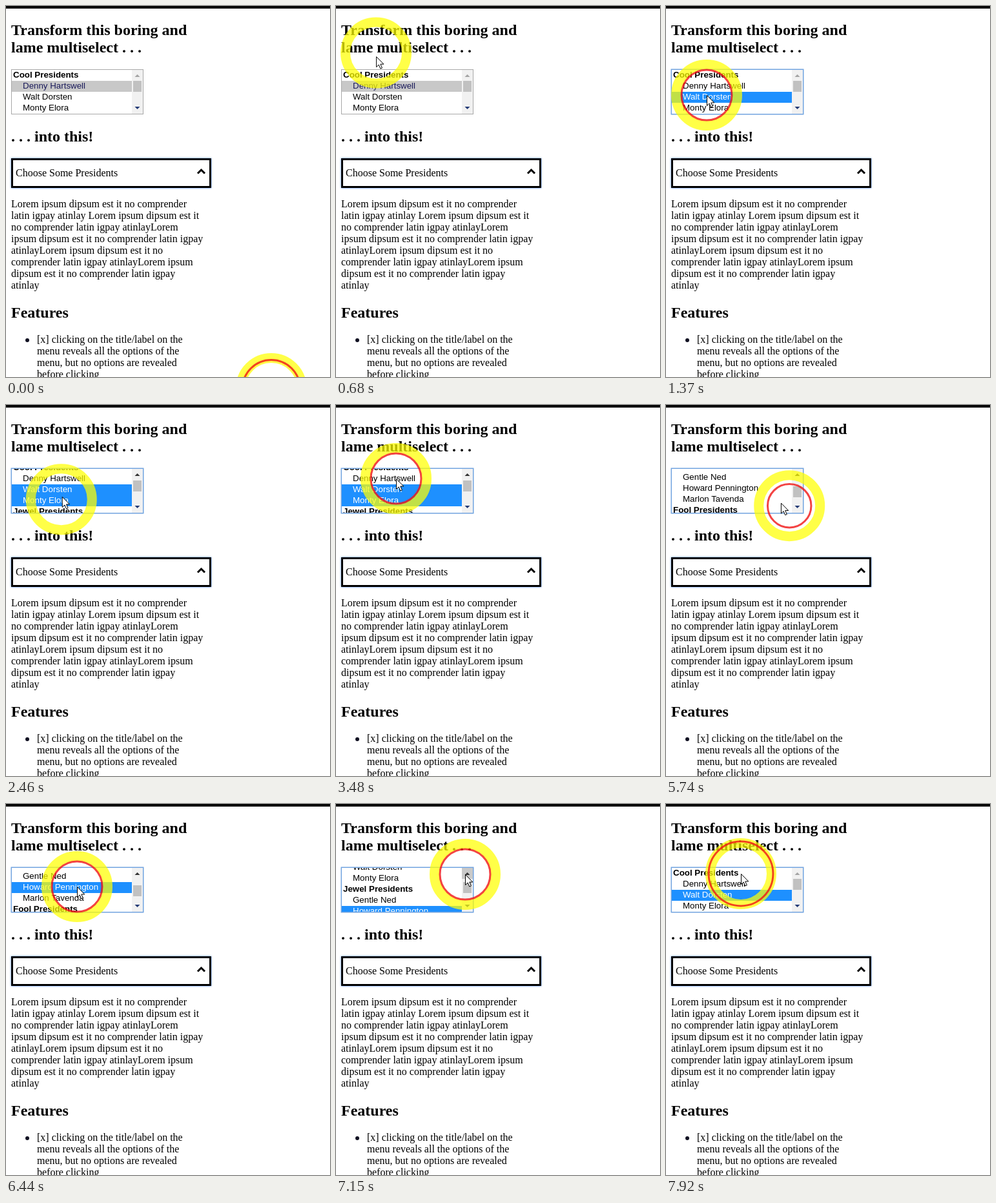
These frames come from a looping animation (502 by 575 pixels, 8 s). An HTML page:

```html
<!DOCTYPE html>
<html lang="en">
<head>
<meta charset="utf-8">
<title>Multiselect demo</title>
<style>
  html, body { margin: 0; width: 100%; height: 100%; overflow: hidden; background: #fff; }
  svg { display: block; }
  .page { font: 16px "Liberation Serif", "Times New Roman", serif; }
  .head { font-size: 24px; font-weight: bold; }
  .list { font: 13.333px "Liberation Sans", Arial, sans-serif; }
  .group { font-weight: bold; }
  .glow { filter: drop-shadow(.5px .5px 1.5px #4d90fe); }
</style>
</head>
<body>
<svg id="stage" class="page" width="502" height="575" viewBox="0 0 502 575">
  <rect width="502" height="4"/>
  <g id="copy"></g>

  <rect class="glow" x="9.5" y="237.5" width="307" height="43" fill="#fff" stroke="#000" stroke-width="3"/>
  <text x="15" y="264">Choose Some Presidents</text>
  <path d="M297 259.5l5.5-5.5 5.5 5.5" fill="none" stroke="#000" stroke-width="3"/>
  <circle cx="33" cy="518" r="3" fill="#112"/>

  <rect id="frame" x="8.5" y="98.5" width="204" height="69" fill="#fff"/>
  <svg class="list" x="9" y="99" width="186" height="68"><g id="rows"></g></svg>
  <rect x="195" y="99" width="17" height="68" fill="#f1f1f1"/>
  <rect id="upButton" x="195" y="99" width="17" height="17" fill="#c9c9c9"/>
  <rect id="downButton" x="195" y="150" width="17" height="17" fill="#c9c9c9"/>
  <rect id="thumb" x="197" width="13" height="17" fill="#c1c1c1"/>
  <path id="upArrow" d="M199.5 110l4-4 4 4z"/>
  <path d="M199.5 156l4 4 4-4z" fill="#233a75"/>

  <g id="halo" fill="none">
    <circle r="47.5" stroke="#ff0" stroke-opacity=".72" stroke-width="15"/>
    <circle id="pulse" stroke="#f01414" stroke-opacity=".8" stroke-width="3"/>
  </g>
  <path id="pointer" d="M.5.5v16l3.7-3.5 2.6 6 2.6-1.1-2.6-5.9h5z" fill="#fff" stroke="#000"/>
</svg>

<script>
const LOOP = 8000, ROW = 17;
const TRAVEL = 400, LAG = 45;             // pointer trip, delay of the halo behind it
const CLOSE = 120, HOLD = 300, FADE = 200; // phases of the click pulse
const GLIDE = 140;                         // one scroll by arrow button
const $ = id => document.getElementById(id);

function add(parent, tag, attrs, text = '') {
  const node = document.createElementNS('http://www.w3.org/2000/svg', tag);
  for (const key in attrs) node.setAttribute(key, attrs[key]);
  node.textContent = text;
  parent.append(node);
  return node;
}

function addLines(x, y, step, cls, lines) {
  lines.forEach((line, i) => add($('copy'), 'text', { x, y: y + i * step, class: cls }, line));
}

addLines(8, 45, 27, 'head', ['Transform this boring and', 'lame multiselect . . .']);
addLines(8, 210, 27, 'head', ['. . . into this!']);
addLines(8, 312, 18, '', [
  'Lorem ipsum dipsum est it no comprender',
  'latin igpay atinlay Lorem ipsum dipsum est it',
  'no comprender latin igpay atinlayLorem',
  'ipsum dipsum est it no comprender latin igpay',
  'atinlayLorem ipsum dipsum est it no',
  'comprender latin igpay atinlayLorem ipsum',
  'dipsum est it no comprender latin igpay',
  'atinlay'
]);
addLines(8, 483, 27, 'head', ['Features']);
addLines(48, 522, 18, '', [
  '[x] clicking on the title/label on the',
  'menu reveals all the options of the',
  'menu, but no options are revealed',
  'before clicking'
]);

const rows = [
  '*Cool Presidents', 'Denny Hartswell', 'Walt Dorsten', 'Monty Elora',
  '*Jewel Presidents', 'Gentle Ned', 'Howard Pennington', 'Marlon Tavenda',
  '*Fool Presidents'
].map((name, i) => {
  const group = name[0] === '*';
  return {
    back: add($('rows'), 'rect', { y: i * ROW, width: 186, height: ROW }),
    label: add($('rows'), 'text', { x: group ? 2 : 17, y: i * ROW + 12, class: group ? 'group' : '' },
      group ? name.slice(1) : name)
  };
});

// The pointer arrives "at" a place; a press (or "act") selects rows and scrolls the list.
const steps = [
  { at: 0, x: 411, y: 593, press: -77, select: [1], scroll: 0 },
  { at: 600, x: 62, y: 71 },
  { at: 1000, x: 63, y: 138, press: 1210, select: [2] },
  { at: 1850, x: 80, y: 172, act: 2000, select: [2, 3], scroll: 10 },
  { at: 2900, x: 93, y: 114, travel: 900, press: 3230, act: 3560, select: [1, 2, 3], scroll: 0 },
  { at: 4560, x: 220, y: 162 },
  { at: 5000, x: 205, y: 161, press: 5130, scroll: 40 },
  { press: 5414, scroll: 80 },
  { at: 6000, x: 110, y: 128, press: 6200, select: [6] },
  { at: 6900, x: 200, y: 109, press: 7020, scroll: 40 },
  { at: 7800, x: 116, y: 108, press: 7883, select: [2], scroll: 0 }
];
const having = key => steps.filter(step => key in step);
const stops = having('at'), presses = having('press'), picks = having('select'), scrolls = having('scroll');

const clamp = k => Math.min(1, Math.max(0, k));
const ease = k => k * k * (3 - 2 * k);
const mix = (a, b, k) => a + (b - a) * k;
const actTime = ({ act, press }) => act ?? press;

function pointerAt(t) {
  return stops.reduce((from, { at, x, y, travel = TRAVEL }) => {
    const k = ease(clamp((t - at) / travel + 1));
    return { x: mix(from.x, x, k), y: mix(from.y, y, k) };
  }, stops[0]);
}

// Selecting jumps the list into place, the arrow buttons glide.
function scrollAt(t) {
  return scrolls.reduce((from, step) => {
    const past = t - actTime(step);
    return mix(from, step.scroll, step.select ? +(past >= 0) : clamp(past / GLIDE));
  }, 0);
}

// The pulse closes in on press, holds, then collapses on release.
function pulseRadius(t) {
  const age = t - presses.findLast(step => step.press <= t).press;
  return age < HOLD ? mix(55, 39, clamp(age / CLOSE)) : mix(39, 0, clamp((age - HOLD) / FADE));
}

const show = (node, on) => node.setAttribute('visibility', on ? 'visible' : 'hidden');
const move = (node, { x, y }) => node.setAttribute('transform', `translate(${x} ${y})`);

function draw(t) {
  const pointer = pointerAt(t);
  const scroll = scrollAt(t);
  const selected = picks.findLast(step => actTime(step) <= t).select;
  const focused = t >= presses[1].press;
  const radius = pulseRadius(t);

  move($('pointer'), pointer);
  move($('halo'), pointerAt(t - LAG));
  $('pulse').setAttribute('r', radius);
  show($('pulse'), radius > 0);

  move($('rows'), { x: 0, y: -Math.round(scroll) });
  rows.forEach(({ back, label }, i) => {
    const on = selected.includes(i);
    back.setAttribute('fill', !on ? '#fff' : focused ? '#1e90ff' : '#c8c8c8');
    label.setAttribute('fill', !on ? '#000' : focused ? '#fff' : '#1a1a5a');
  });

  $('frame').setAttribute('stroke', focused ? '#72a4e0' : '#a9a9a9');
  $('frame').setAttribute('stroke-width', focused ? 2 : 1);
  $('thumb').setAttribute('y', 116 + Math.round(scroll / 8));
  $('upArrow').setAttribute('fill', scroll > 0 ? '#333' : '#a3a3a3');
  const overBar = pointer.x >= 195 && pointer.x < 213;
  show($('upButton'), overBar && pointer.y >= 99 && pointer.y < 116);
  show($('downButton'), overBar && pointer.y >= 150 && pointer.y < 168);
}

const start = performance.now();
function tick() {
  draw((performance.now() - start) % LOOP);
  requestAnimationFrame(tick);
}
tick();
</script>
</body>
</html>
```
